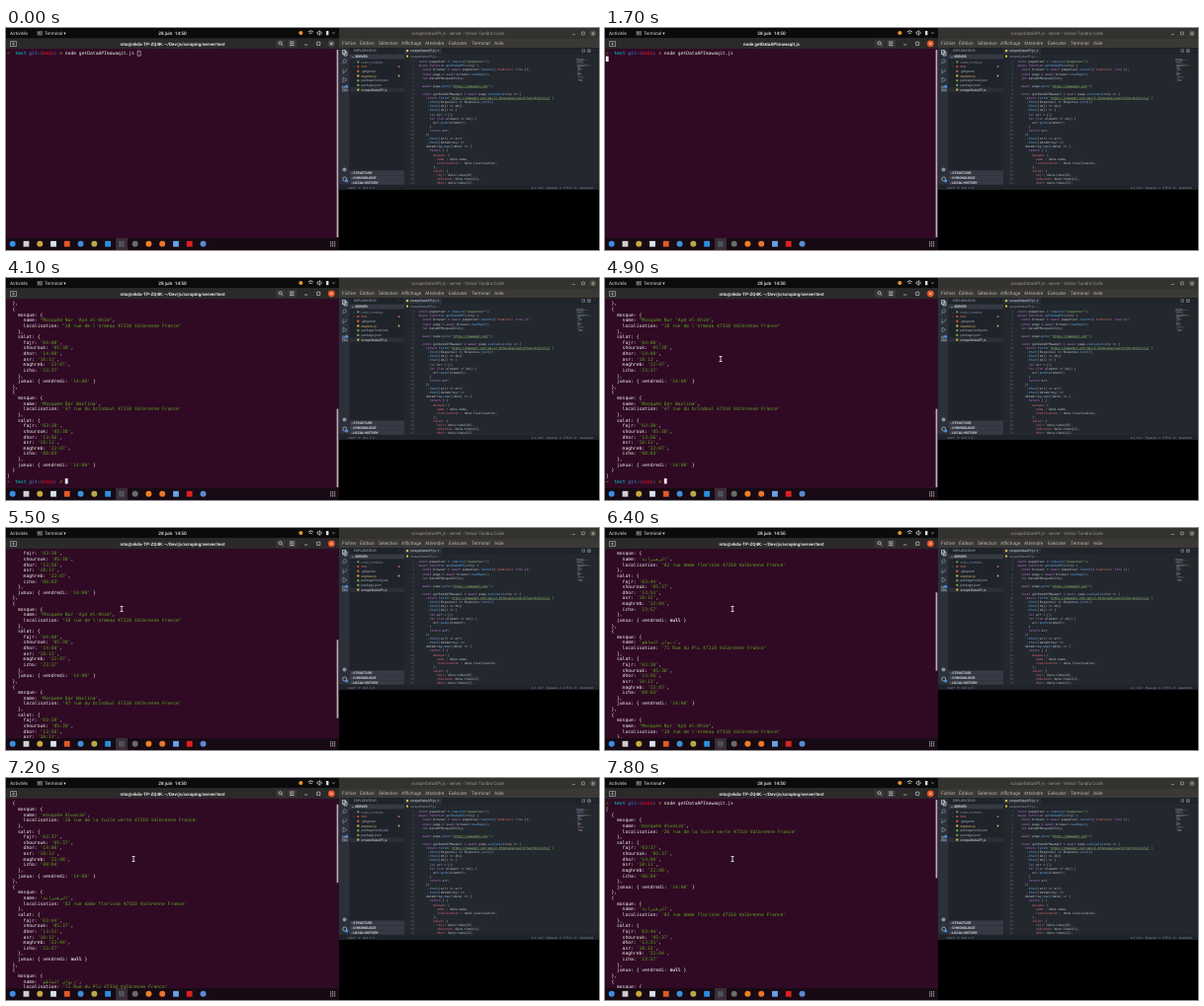
Write an HTML page with a canvas that moves like this. It is 600 by 225 pixels and loops after 8000 ms.

```html
<!DOCTYPE html>
<html lang="fr">
<head>
<meta charset="utf-8">
<title>Terminal</title>
<style>
html, body { margin: 0; width: 600px; height: 225px; overflow: hidden; background: #000; }
canvas { display: block; }
</style>
</head>
<body>
<canvas id="stage" width="600" height="225"></canvas>
<script>
const ctx = document.getElementById('stage').getContext('2d');
ctx.textRendering = 'geometricPrecision';
const MONO = '"DejaVu Sans Mono", monospace', SANS = 'Roboto, sans-serif';
const LOOP = 8000, FOCUS = 100, ENTER = 1300, OUTPUT = 4100, POINTER = 4500;
const WHEEL = [5300, 5500, 5600, 5800, 5900, 6100, 6400, 6500, 6700, 6800, 7200, 7400];
const CELL = 2.81, ROW = 5.63, VISIBLE = 33;
const COMMAND = 'node getDataAPImawaqit.js';

function rect(x, y, w, h, color) {
  ctx.fillStyle = color;
  ctx.fillRect(x, y, w, h);
}
function disc(x, y, r, color) {
  ctx.fillStyle = color;
  ctx.beginPath();
  ctx.arc(x, y, r, 0, 7);
  ctx.fill();
}
function path(d, color, width = 0.7) {
  ctx.strokeStyle = color;
  ctx.lineWidth = width;
  ctx.stroke(new Path2D(d));
}
function text(str, x, y, size, color, { weight = 400, align = 'left', font = SANS } = {}) {
  ctx.font = `${weight} ${size}px ${font}`;
  ctx.textAlign = align;
  ctx.fillStyle = color;
  ctx.fillText(str, x, y);
}

// Terminal contents: rows of [text, color, weight] segments
const WHITE = '#eeeeec', GREEN = '#5aa51e', BLUE = '#3465a4';
const prompt = [['➜  ', '#4e9a06', 700], ['test ', '#06a0a4', 700], ['git:(', BLUE, 700],
  ['main', '#cc1020', 700], [') ', BLUE, 700], ['✗ ', '#c4a000', 700]];
const quote = s => s.includes("'") ? `"${s}"` : `'${s}'`;
const times = ['fajr', 'shourouk', 'dhor', 'asr', 'maghreb', 'icha'];
const mosques = [
  ['mosquée Alwasim', '26 rue de la tuile verte', '03:37 05:37 14:00 18:11 22:08 00:04', '14:00'],
  ['الزهيرانة', '82 rue dame florisse', '03:44 05:37 13:51 18:12 22:04 23:57', null],
  ['ديوان الساطع', '71 Rue du Pli', '03:38 05:38 13:56 18:11 22:07 00:03', '14:00'],
  ["Mosquée Nur 'Ayd el-Khim", "18 rue de l'ormeau", '04:08 05:38 14:00 18:11 22:07 23:37', '14:00'],
  ['Mosquée Dar Waslina', '47 rue du brindoul', '03:38 05:38 13:56 18:11 22:07 00:03', '14:00']
];
const plain = s => [[s, WHITE]];
const field = (key, value, end) => [[`      ${key}: `, WHITE], [quote(value), GREEN], [end, WHITE]];

const lines = [[...prompt, [COMMAND, WHITE]], plain('[')];
mosques.forEach(([name, street, hours, friday], i) => {
  const h = hours.split(' ');
  lines.push(
    plain('  {'), plain('    mosque: {'),
    field('name', name, ','),
    field('localisation', `${street} 47310 Valbrenne France`, ''),
    plain('    },'), plain('    salat: {'),
    ...times.map((key, k) => field(key, h[k], k < 5 ? ',' : '')),
    plain('    },'),
    [['    jumua: { vendredi: ', WHITE], friday ? [quote(friday), GREEN] : ['null', WHITE, 700], [' }', WHITE]],
    plain(i < mosques.length - 1 ? '  },' : '  }'));
});
lines.push(plain(']'), prompt);

function drawRow(segments, row) {
  let col = 0;
  for (const [str, color, weight] of segments) {
    text(str, 0.8 + col * CELL, 27.4 + row * ROW, 4.67, color, { weight, font: MONO });
    col += str.length;
  }
}
function drawCursor(col, row, hollow) {
  const x = 0.8 + col * CELL, y = 23 + row * ROW;
  if (hollow) path(`M${x + 0.3} ${y + 0.3}h3v4.9h-3z`, '#e0d6dc', 0.6);
  else rect(x, y, CELL, 5.4, '#f4eef2');
}

function drawHeader(t) {
  const title = t >= ENTER && t < OUTPUT ? COMMAND : 'mto@vkda-TP-ZQ4K: ~/Dev/js/scraping/server/test';
  rect(0, 10.5, 337, 10.5, '#2b292a');
  path('M4.5 13.5h6v5h-6zM7.5 14.5v3M6 16h3', '#aaa');
  text(title, 168.5, 17.5, 4.55, '#e6e6e6', { weight: 700, align: 'center' });
  rect(273, 11.8, 9.5, 8, '#383536');
  rect(284.5, 11.8, 9.5, 8, '#383536');
  path('M276 15.2a1.5 1.5 0 1 1 3 0a1.5 1.5 0 1 1-3 0M278.7 16.3l1.4 1.4', '#ddd');
  path('M287 14h4.5M287 15.8h4.5M287 17.6h4.5', '#ddd');
  path('M302 17h3.2M314.6 14.2h3.2v3.2h-3.2z', '#ccc');
  disc(329.3, 15.8, 3.4, t < FOCUS ? '#4a4748' : '#e95420');
  path('M328.1 14.6l2.4 2.4M330.5 14.6l-2.4 2.4', '#fff');
}

function drawTerminal(t) {
  drawHeader(t);
  ctx.save();
  ctx.beginPath();
  ctx.rect(0, 21, 337, 192);
  ctx.clip();
  rect(0, 21, 337, 192, '#300a24');
  let scroll = 0, total = VISIBLE;
  if (t < OUTPUT) {
    drawRow(lines[0], 0);
    if (t < ENTER) drawCursor(47, 0, t < FOCUS);
    else drawCursor(0, 1);
  } else {
    total = lines.length;
    scroll = Math.max(0, total - VISIBLE - 4 * WHEEL.filter(at => at <= t).length);
    lines.slice(scroll, scroll + VISIBLE + 1).forEach(drawRow);
    drawCursor(21, total - 1 - scroll);
  }
  const unit = 190 / total;
  rect(334.6, 22 + scroll * unit, 1.7, VISIBLE * unit, '#b8b0b6');
  if (t >= POINTER) {
    const x = 117 + 12 * Math.min(1, Math.max(0, (t - 5700) / 500));
    path(`M${x - 1.5} 79.5h3M${x} 79.5v5M${x - 1.5} 84.5h3`, '#fff', 0.8);
  }
  ctx.restore();
}

function drawDesktop() {
  rect(0, 0, 337, 10.5, '#0c0b0c');
  text('Activités', 4, 6.9, 4.7, '#ddd');
  rect(31.5, 3, 5.5, 4.6, '#55585a');
  text('>', 32.3, 6.4, 3.5, '#eee');
  text('Terminal ▾', 39, 6.9, 4.7, '#ddd');
  text('28 juin  14:50', 168.5, 6.9, 4.7, '#eee', { align: 'center', weight: 500 });
  disc(298.3, 5, 2.1, '#e8912c');
  path('M305.8 4q2.5-2.6 5 0M307 5.6q1.3-1.3 2.6 0', '#ddd', 0.9);
  path('M315 4v2h1.1l1.5 1.4v-4.8l-1.5 1.4zM318.8 3.6q1 1.4 0 2.8', '#ddd');
  rect(324, 3, 2.4, 4.2, '#ddd');
  path('M330.3 4.5l1.2 1.2 1.2-1.2', '#ddd');

  // Dock
  rect(0, 213, 337, 12, '#170a14');
  rect(111, 213, 12, 12, '#3a2c37');
  ['#3a8ee6', '#cfcfcf', '#c9a83c', '#d8e2ee', '#e05a28', '#3f8fd8', '#b8a848', '#2a8fe0',
    '#4a5358', '#6a6c68', '#f08020', '#e8762c', '#6aa0e8', '#e02020', '#5a8ad0'].forEach((color, i) => {
    const x = 6.7 + i * 13.77;
    if ([1, 3, 4, 7, 8, 12, 13].includes(i)) rect(x - 2.9, 215.9, 5.8, 5.8, color);
    else disc(x, 218.8, 3, color);
  });
  for (let i = 0; i < 9; i++) rect(328 + i % 3 * 2, 216.3 + Math.floor(i / 3) * 2, 1.2, 1.2, '#aaa');
}

const source = `const puppeteer = require("puppeteer");
async function getDataAPI(city) {
  const browser = await puppeteer.launch({ headless: true });
  const page = await browser.newPage();
  let dataOfMosqueInCity;

  await page.goto("https://mawaqit.net");

  const getDataOfMawaqit = await page.evaluate(city => {
    return fetch(\`https://mawaqit.net/api/2.0/mosque/search?word=\${city}\`)
     .then((Response) => Response.json())
     .then((obj) => obj)
     .then((obj) => {
      let arr = [];
      for (let element of obj) {
        arr.push(element);
      }
      return arr;
    })
     .then((arr) => arr)
     .then((dataArray) =>
    dataArray.map((data) => {
      return [ {
        mosque: {
          name : data.name,
          localisation : data.localisation,
        },
        salat: {
          fajr: data.times[0],
          shourouk: data.times[1],
          dhor: data.times[2],`;
const token = /(["`].*?["`])|\b(const|let|async|function|await|return|for|of|true)\b|(\w+)(?=\()|(\w+)(?= *:)|\s+|\w+|./g;
const tokenColors = ['#98c379', '#c678dd', '#61afef', '#e06c75'];

function drawCode() {
  const width = 1.85, pitch = 4.1;
  source.split('\n').forEach((line, i) => {
    const y = 35.2 + i * pitch;
    text(i + 1, 413, y, 3, '#5c6370', { align: 'right', font: MONO });
    for (const m of line.matchAll(token)) {
      const kind = m.slice(1).findIndex(Boolean);
      const color = tokenColors[kind] || '#c3c8d2';
      const x = 417.5 + m.index * width;
      text(m[0], x, y, 3.07, color, { font: MONO });
      if (m[0].includes('http')) rect(x + width, y + 0.6, (m[0].length - 2) * width, 0.3, '#98c379');
      // Minimap
      if (m[0].trim()) rect(577 + m.index * 0.2, 31 + i * 0.75, m[0].length * 0.2, 0.45, color + '90');
    }
  });
}

function drawEditor() {
  rect(337, 0, 263, 11, '#33322f');
  text('scrapeDataAPI.js - server - Velsor Tundra Code', 457, 7.4, 4.55, '#96938b', { align: 'center' });
  path('M573 6.5h2.8M582.5 4h2.8v2.8h-2.8z', '#a8a59c');
  disc(594, 5.6, 3, '#55534e');
  path('M592.9 4.5l2.2 2.2M595.1 4.5l-2.2 2.2', '#c8c4ba');
  rect(337, 11, 263, 9.5, '#3a3936');
  [['Fichier', 340], ['Édition', 358], ['Sélection', 377], ['Affichage', 400], ['Atteindre', 424],
    ['Exécuter', 448], ['Terminal', 471], ['Aide', 494]].forEach(([name, x]) => text(name, x, 17.4, 4.8, '#b9b5ac'));

  rect(337, 20.5, 263, 143.5, '#23272e');
  rect(337, 20.5, 10.5, 138, '#2b303a');
  rect(347.5, 20.5, 55.5, 138, '#1f232a');

  // Activity bar
  path('M340.5 22.5h3v4h-3zM342 24h3v4h-3z', '#d7dae0');
  path('M341 33.5a1.7 1.7 0 1 1 3.4 0a1.7 1.7 0 1 1-3.4 0M341.4 34.8l-1.4 1.8', '#8a919e');
  path('M341 41.5v5M344.3 41.5v1.5q0 1.5-3.3 2', '#8a919e');
  path('M341 50l4 2.5-4 2.5z', '#8a919e');
  path('M340.5 59h2v2h-2zM340.5 62h2v2h-2zM343.5 62h2v2h-2z', '#8a919e');
  disc(344.6, 59.3, 1.6, '#4a8fd8');
  disc(342.5, 143.5, 2, '#8a919e');
  path('M340.7 153a2 2 0 1 1 4 0a2 2 0 1 1-4 0', '#a0a6b2', 0.9);
  disc(344.8, 155, 1.6, '#4a8fd8');

  // Explorer
  const small = (str, x, y, color = '#a9b0bc', weight = 400) => text(str, x, y, 3.4, color, { weight });
  const section = (name, y) => {
    rect(347.5, y - 3.7, 55.5, 4.9, '#353a44');
    small(name, 349.5, y, '#d7dae0', 700);
  };
  small('EXPLORATEUR', 352, 24.4);
  small('···', 396, 24.4);
  section('⌄ SERVER', 30.3);
  rect(347.5, 60.4, 55.5, 4.6, '#2a2f37');
  [['node_modules', '#7f8694'], ['test', '#d87a60'], ['.gitignore'], ['express.js', '#d9b878'],
    ['package-lock.json'], ['package.json'], ['scrapeDataAPI.js', '#e0e3e8']].forEach(([name, color], i) => {
    const y = 35.6 + i * 4.7;
    if (i < 2) small('›', 351.5, y, '#a9b0bc');
    rect(355.3, y - 2.2, 2, 2, ['#6f9c50', '#c24a3c', '#e06030', '#e0c040', '#7fae50', '#7fae50', '#e0c040'][i]);
    small(name, 359.5, y, color);
    if (i === 1 || i === 3) disc(397.5, y - 1.2, 0.9, color);
  });
  ['STRUCTURE', 'CHRONOLOGIE', 'LOCAL HISTORY'].forEach((name, i) => section('› ' + name, 148.2 + i * 4.9));

  // Tab and breadcrumb
  rect(403, 20.5, 197, 5.5, '#1f232a');
  rect(403, 20.5, 38, 5.5, '#2c313a');
  rect(405, 22, 2.1, 2.1, '#e0c040');
  small('scrapeDataAPI.js  ×', 409, 24.4, '#d7dae0');
  path('M583 21.8h2.5v2.5h-2.5zM588.5 21.8h2.8v2.6h-2.8zM590 21.8v2.6', '#a9b0bc', 0.5);
  small('···', 594.5, 24.2);
  rect(405, 27.6, 2, 2, '#e0c040');
  small('scrapeDataAPI.js › ...', 409, 30, '#8a919e');
  drawCode();

  // Status bar
  rect(337, 158.8, 263, 5.2, '#1f232a');
  text('main*   ⟳   ⊗ 0  ⚠ 0', 346, 162.6, 3, '#8a919e');
  text('Li 1, Col 1   Espaces : 2   UTF-8   LF   JavaScript', 594, 162.6, 3, '#8a919e', { align: 'right' });
}

function frame() {
  drawTerminal(performance.now() % LOOP);
  requestAnimationFrame(frame);
}

drawDesktop();
drawEditor();
frame();
</script>
</body>
</html>
```
